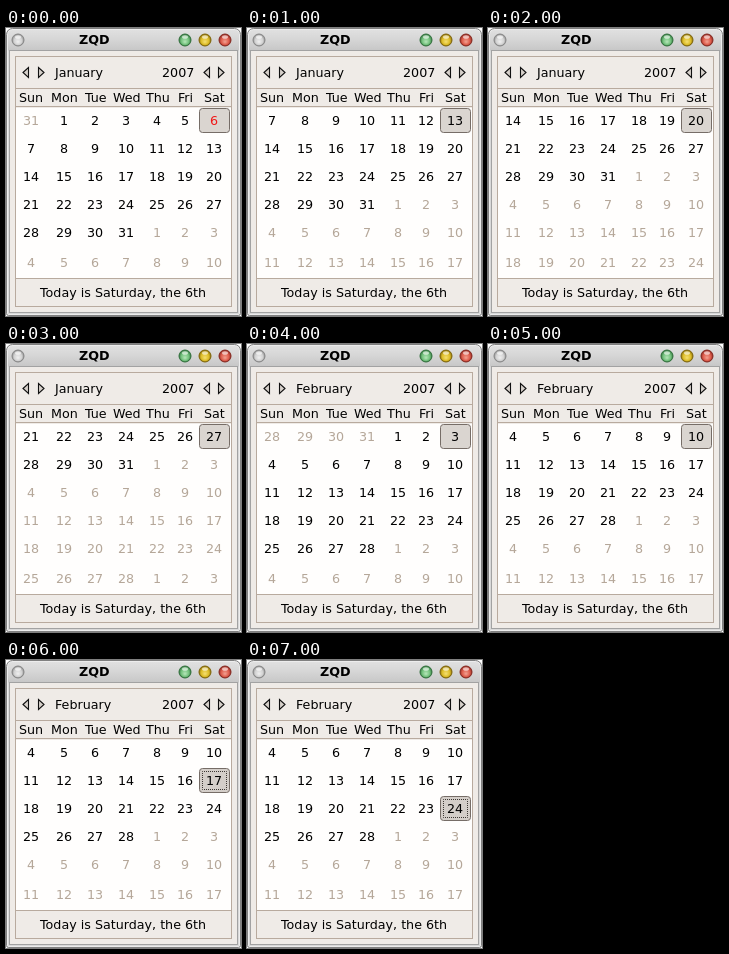
An HTML page with a canvas for the animation above (8000 ms loop, 235 by 288 pixels).

```html
<!DOCTYPE html>
<html lang="en">
<head>
<meta charset="utf-8">
<title>Calendar</title>
<style>
html, body { margin: 0; width: 100%; height: 100%; overflow: hidden; background: #fff; }
canvas { display: block; width: 235px; height: 288px; }
</style>
</head>
<body>
<canvas id="stage" width="235" height="288"></canvas>
<script>
const ctx = document.getElementById('stage').getContext('2d');
const LOOP = 8000;
const FONT = '12.7px "DejaVu Sans", sans-serif';
const INK = '#000', MUTED = '#b5a799', TODAY = '#f01818';
const LINE = '#b8aa9e', PANEL = '#efebe7';
const DAYS = ['Sun', 'Mon', 'Tue', 'Wed', 'Thu', 'Fri', 'Sat'];
const COLUMNS = [25, 58, 89, 120, 151, 179, 208];
const MONTHS = ['January', 'February'];

function fill(color, x, y, w, h) {
  ctx.fillStyle = color;
  ctx.fillRect(x, y, w, h);
}

function outline(color, x, y, w, h) {
  ctx.strokeStyle = color;
  ctx.lineWidth = 1;
  ctx.strokeRect(x + .5, y + .5, w - 1, h - 1);
}

function vertical(y0, y1, ...colors) {
  const g = ctx.createLinearGradient(0, y0, 0, y1);
  colors.forEach((c, i) => g.addColorStop(i / (colors.length - 1), c));
  return g;
}

function roundBox(x, y, w, h, radii) {
  ctx.beginPath();
  ctx.roundRect(x + .5, y + .5, w - 1, h - 1, radii);
}

function text(str, x, y, color = INK) {
  ctx.fillStyle = color;
  ctx.fillText(str, x, y);
}

function centered(str, cx, y, color = INK, font = FONT) {
  ctx.font = font;
  text(str, Math.round(cx - ctx.measureText(str).width / 2), y, color);
}

function ball(x, light, mid, dark) {
  ctx.beginPath();
  ctx.arc(x, 12, 6, 0, Math.PI * 2);
  const g = ctx.createRadialGradient(x, 14, 0, x, 12, 6.5);
  g.addColorStop(0, light);
  g.addColorStop(.6, mid);
  g.addColorStop(1, dark);
  ctx.fillStyle = g;
  ctx.fill();
  ctx.strokeStyle = dark;
  ctx.lineWidth = 1;
  ctx.stroke();
  ctx.beginPath();
  ctx.ellipse(x, 9, 3, 1.8, 0, 0, Math.PI * 2);
  ctx.fillStyle = 'rgba(255,255,255,.6)';
  ctx.fill();
}

function arrow(x, dir) {
  ctx.beginPath();
  ctx.moveTo(x + dir * 3, 44.5);
  ctx.lineTo(x - dir * 2.5, 39.5);
  ctx.lineTo(x - dir * 2.5, 49.5);
  ctx.closePath();
  ctx.fillStyle = '#d8d2cc';
  ctx.fill();
  ctx.strokeStyle = '#111';
  ctx.lineWidth = 1.1;
  ctx.stroke();
}

function drawWindow() {
  ctx.clearRect(0, 0, 235, 288);
  roundBox(0, 0, 235, 288, [6, 6, 2, 2]);
  ctx.fillStyle = '#d8d8d8';
  ctx.fill();
  roundBox(0, 0, 235, 23, [6, 6, 0, 0]);
  ctx.fillStyle = vertical(0, 23, '#e2e2e2', '#d6d6d6', '#c6c6c6');
  ctx.fill();
  roundBox(1, 1, 233, 286, [5, 5, 1, 1]);
  ctx.strokeStyle = '#ededed';
  ctx.lineWidth = 1;
  ctx.stroke();
  roundBox(0, 0, 235, 288, [6, 6, 2, 2]);
  ctx.strokeStyle = '#808080';
  ctx.stroke();
  fill(PANEL, 4, 23, 227, 261);
  outline('#a2a2a2', 3, 22, 229, 263);

  ball(12, '#efefef', '#d2d2d2', '#858585');
  ball(179, '#b5e6b8', '#72c07c', '#2f6e3a');
  ball(199, '#f5df70', '#dcbc28', '#7e6408');
  ball(219, '#f2a090', '#dd5c4c', '#84261e');
  centered('ZQD', 88, 16, INK, 'bold ' + FONT);
}

function drawPanel(month) {
  fill('#fffefd', 10, 80, 215, 170);
  outline(LINE, 9, 28, 217, 251);
  for (const y of [60, 78, 250]) fill(LINE, 10, y, 215, 1);
  [[20, -1], [35, 1], [201, -1], [215, 1]].forEach(a => arrow(...a));
  ctx.font = FONT;
  text(MONTHS[month], 49, 49);
  text('2007', 156, 49);
  DAYS.forEach((day, i) => centered(day, COLUMNS[i] + .5, 74));
  centered('Today is Saturday, the 6th', 117, 269);
}

function drawSelection(row, focused) {
  const y = 80 + row * 28;
  roundBox(193, y, 31, 25, 3);
  ctx.fillStyle = focused ? '#d4cec9' : '#dad5d0';
  ctx.fill();
  ctx.strokeStyle = '#766d67';
  ctx.lineWidth = 1;
  ctx.stroke();
  if (focused) {
    ctx.setLineDash([1, 1]);
    ctx.lineDashOffset = .5;
    outline('#3c3733', 196, y + 3, 25, 19);
    ctx.setLineDash([]);
  }
}

function drawDays(firstWeek, month) {
  for (let row = 0; row < 6; row++) {
    const y = row < 5 ? 97 + row * 28 : 239;
    COLUMNS.forEach((x, col) => {
      const date = new Date(2006, 11, 31 + (firstWeek + row) * 7 + col);
      const day = date.getDate();
      const isToday = date.getMonth() === 0 && day === 6;
      const color = isToday ? TODAY : date.getMonth() === month ? INK : MUTED;
      centered(String(day), x, y, color);
    });
  }
}

// The list scrolls a week per second, then the selection walks down.
function render(now) {
  const week = Math.floor(now % LOOP / 1000);
  const firstWeek = Math.min(week, 5);
  const month = week < 4 ? 0 : 1;
  drawWindow();
  drawPanel(month);
  drawSelection(week - firstWeek, week > 5);
  drawDays(firstWeek, month);
}

const start = performance.now();
function tick() {
  render(performance.now() - start);
  requestAnimationFrame(tick);
}
tick();
</script>
</body>
</html>
```
